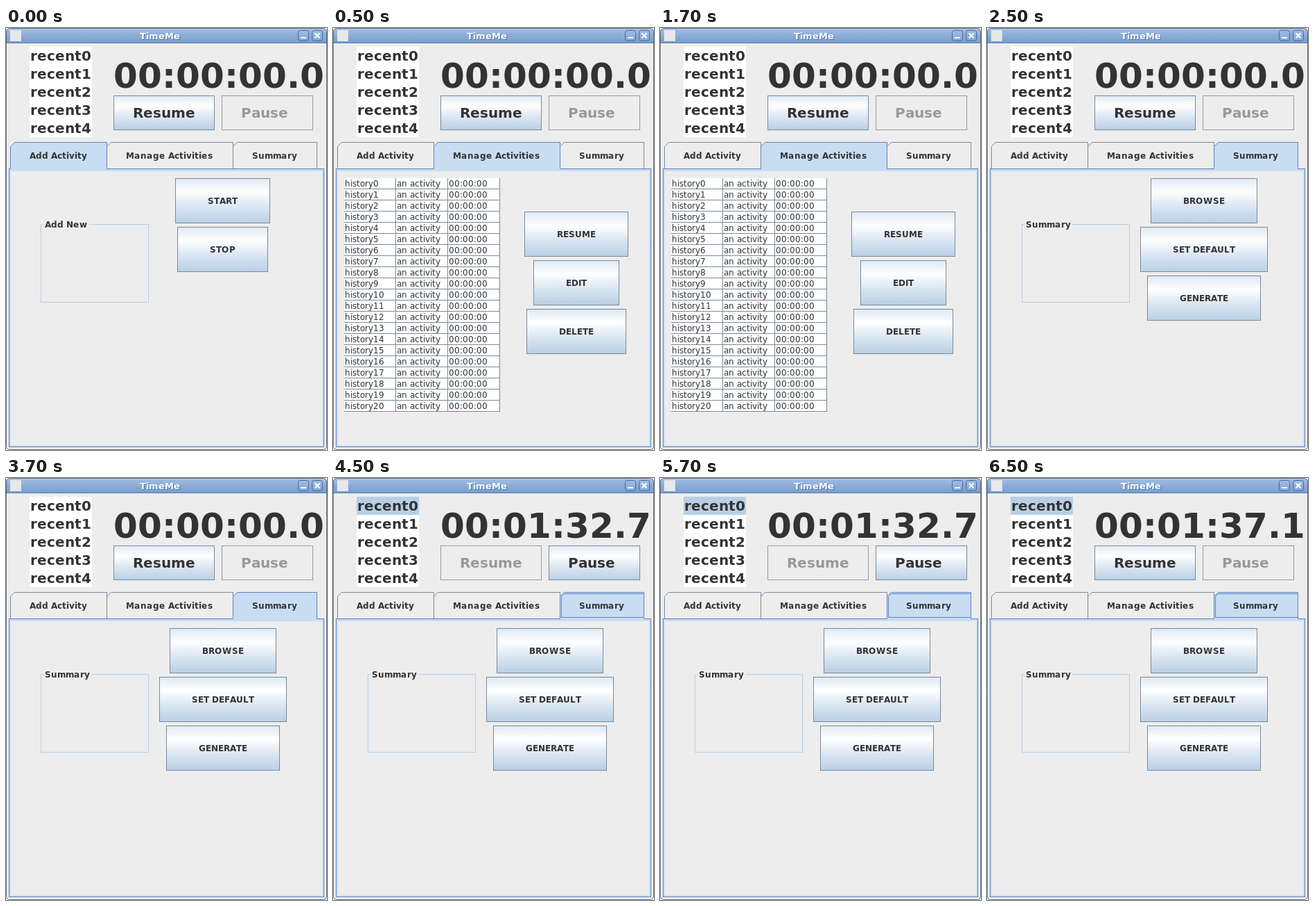
Write an HTML page with a canvas that moves like this. It is 463x607 px and loops after 8 s.

```html
<!DOCTYPE html>
<html lang="en">
<head>
<meta charset="utf-8">
<title>TimeMe</title>
<style>
  html, body { margin: 0; width: 100%; height: 100%; overflow: hidden; background: #fff; }
  canvas { display: block; width: 463px; height: 607px; }
</style>
</head>
<body>
<canvas id="stage" width="463" height="607"></canvas>
<script>
const ctx = document.getElementById('stage').getContext('2d');
const W = 463, H = 607, LOOP = 8000;
const INK = '#333333', PANEL = '#ededed', EDGE = '#7a8a99', BLUE = '#6382bf',
      PALE = '#c8ddf2', SELECT = '#b8cfe5', OFF = '#999999';

const STATES = [
  { from: 0,    tab: 0, clock: '00:00:00.0' },
  { from: 500,  tab: 1, clock: '00:00:00.0' },
  { from: 2500, tab: 2, clock: '00:00:00.0' },
  { from: 4500, tab: 2, clock: '00:01:32.7', picked: true, running: true },
  { from: 6500, tab: 2, clock: '00:01:37.1', picked: true }
];

// Whole-pixel advances of the hinted 12px bold face where they differ from rounding
const HINTS = { O: 11, W: 14, a: 9, e: 9, m: 12 };

function fill(x, y, w, h, color) {
  ctx.fillStyle = color;
  ctx.fillRect(x, y, w, h);
}

function box(x, y, w, h, color) {
  ctx.strokeStyle = color;
  ctx.lineWidth = 1;
  ctx.strokeRect(x + .5, y + .5, w - 1, h - 1);
}

function path(points, color) {
  ctx.beginPath();
  points.forEach(([x, y]) => ctx.lineTo(x + .5, y + .5));
  ctx.strokeStyle = color;
  ctx.lineWidth = 1;
  ctx.stroke();
}

function gradient(y, h, stops) {
  const g = ctx.createLinearGradient(0, y, 0, y + h);
  stops.forEach(([at, color]) => g.addColorStop(at, color));
  return g;
}

// Glyphs sit on whole pixels, as the toolkit lays them out
function text(str, x, y, size = 12, color = INK, weight = 'bold') {
  ctx.font = `${weight} ${size}px "DejaVu Sans", sans-serif`;
  ctx.fillStyle = color;
  const hints = size === 12 && weight === 'bold' ? HINTS : {};
  for (const c of str) {
    ctx.fillText(c, x, y);
    x += hints[c] || Math.round(ctx.measureText(c).width);
  }
}

function buttonFace(x, y, w, h, on = true) {
  if (on) {
    fill(x, y, w, h, gradient(y, h,
      [[0, '#dde8f3'], [.3, '#ffffff'], [.6, '#dde8f3'], [1, '#b8cfe5']]));
  }
  box(x, y, w, h, on ? EDGE : OFF);
}

function button(label, x, y, w) {
  buttonFace(x, y, w, 65);
  text(label, x + 47, y + 37);
}

function bigButton(label, x, w, textX, on) {
  buttonFace(x, 97, w, 50, on);
  text(label, textX, 129, 20, on ? INK : OFF);
}

function titleButton(x) {
  ctx.beginPath();
  ctx.roundRect(x + .5, 3.5, 15, 15, 3);
  ctx.fillStyle = gradient(3, 16, [[0, '#a3bfe4'], [1, '#7fa2d2']]);
  ctx.fill();
  ctx.strokeStyle = '#466a9f';
  ctx.lineWidth = 1;
  ctx.stroke();
}

function windowFrame() {
  fill(0, 0, W, H, '#ffffff');
  ctx.beginPath();
  ctx.roundRect(.5, .5, W - 1, H - 1, 5);
  ctx.fillStyle = PANEL;
  ctx.fill();
  ctx.save();
  ctx.clip();
  fill(0, 0, W, 22, gradient(0, 22, [[0, '#a3c0e6'], [.5, '#8bacd9'], [1, '#779dcd']]));
  fill(0, 1, W, 1, '#b4cdec');
  fill(0, 21, W, 1, '#557baf');
  fill(1, 22, 1, H - 23, '#fafafa');
  ctx.restore();
  ctx.strokeStyle = '#5c6570';
  ctx.lineWidth = 1;
  ctx.stroke();

  fill(6, 3, 16, 16, '#e6e8ea');
  text('TimeMe', 194, 17, 13, '#4f71a3');
  text('TimeMe', 193, 16, 13, '#ffffff');
  titleButton(421);
  fill(425, 13, 8, 2, '#ffffff');
  titleButton(441);
  ctx.beginPath();
  ctx.moveTo(445.5, 7.5); ctx.lineTo(452.5, 14.5);
  ctx.moveTo(452.5, 7.5); ctx.lineTo(445.5, 14.5);
  ctx.strokeStyle = '#ffffff';
  ctx.lineWidth = 2;
  ctx.stroke();
}

function header(s) {
  fill(34, 27, 90, 130, '#ffffff');
  if (s.picked) fill(34, 27, 90, 26, SELECT);
  for (let i = 0; i < 5; i++) text('recent' + i, 35, 47 + 26 * i, 20);
  text(s.clock, 155, 86, 50);
  bigButton('Resume', 155, 146, 183, !s.running);
  bigButton('Pause', 311, 132, 339, !!s.running);
}

const TABS = [
  { label: 'Add Activity', x: 6, end: 145, textX: 34 },
  { label: 'Manage Activities', x: 145, end: 327, textX: 173 },
  { label: 'Summary', x: 327, end: 448, textX: 355 }
];

function tabOutline({ x, end }, color) {
  path([[x, 202], [x, 170], [x + 6, 164], [end, 164], [end, 202]], color);
}

function tabs(s) {
  const sel = TABS[s.tab];
  fill(4, 202, 455, 401, PALE);
  fill(7, 206, 449, 394, PANEL);
  box(4, 202, 455, 401, BLUE);
  TABS.forEach(t => tabOutline(t, EDGE));
  fill(4, 202, 455, 1, BLUE);

  ctx.beginPath();
  ctx.moveTo(sel.x + .5, 203);
  ctx.lineTo(sel.x + .5, 170.5);
  ctx.lineTo(sel.x + 6.5, 164.5);
  ctx.lineTo(sel.end + .5, 164.5);
  ctx.lineTo(sel.end + .5, 203);
  ctx.fillStyle = PALE;
  ctx.fill();
  tabOutline(sel, BLUE);
  if (s.picked) {
    const l = sel.x + 2, r = sel.end;
    path([[l, 200], [l, 170], [l + 4, 166], [r, 166], [r, 200], [l, 200]], BLUE);
  }
  TABS.forEach(t => text(t.label, t.textX, 188));
}

function group(label, gapEnd) {
  box(50, 282, 156, 113, SELECT);
  fill(54, 282, gapEnd - 54, 1, PANEL);
  text(label, 56, 287);
}

function table() {
  fill(16, 216, 225, 336, '#ffffff');
  for (let i = 0; i < 21; i++) {
    const y = 216 + 16 * i;
    ['history' + i, 'an activity', '00:00:00'].forEach((cell, c) =>
      text(cell, 17 + 75 * c, y + 12, 12, INK, 'normal'));
    fill(16, y + 15, 225, 1, EDGE);
  }
  for (const x of [90, 165, 240]) fill(x, 216, 1, 336, EDGE);
}

const PAGES = [
  () => {
    group('Add New', 120);
    button('START', 244, 216, 137);
    button('STOP', 247, 286, 131);
  },
  () => {
    table();
    button('RESUME', 276, 264, 150);
    button('EDIT', 289, 334, 124);
    button('DELETE', 279, 404, 144);
  },
  () => {
    group('Summary', 123);
    button('BROWSE', 236, 216, 154);
    button('SET DEFAULT', 221, 286, 184);
    button('GENERATE', 231, 356, 164);
  }
];

function draw(s) {
  windowFrame();
  header(s);
  tabs(s);
  PAGES[s.tab]();
}

const start = performance.now();
let shown = null;

function tick() {
  const t = (performance.now() - start) % LOOP;
  const state = STATES.findLast(s => s.from <= t);
  if (state !== shown) draw(shown = state);
  requestAnimationFrame(tick);
}
tick();
</script>
</body>
</html>
```
